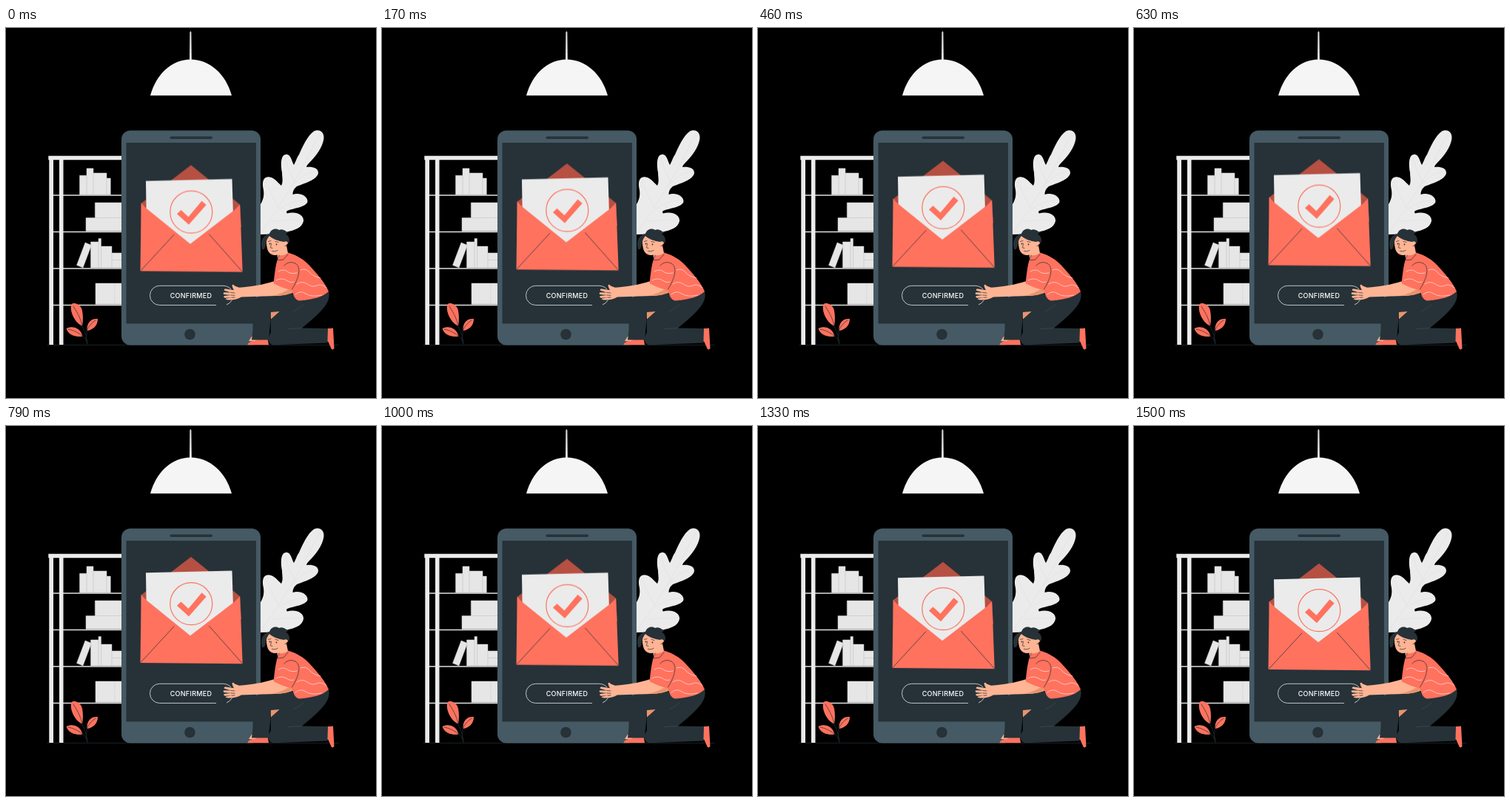
These frames come from a looping animation (500x500 px, 1.54 s). An HTML page:

```html
<!DOCTYPE html>
<html lang="en">
<head>
<meta charset="utf-8">
<title>Confirmed</title>
<style>
  html, body { margin: 0; width: 100%; height: 100%; overflow: hidden; background: #000; }
  svg { display: block; width: 100%; height: 100%; }
  .coral { fill: #ff725e; }
  .dark { fill: #263238; }
  .slate { fill: #455a64; }
  .pale { fill: #ebebeb; }
  .skin { fill: #ffb494; }
  .line { fill: none; stroke: #263238; stroke-width: .7; stroke-linecap: round; stroke-linejoin: round; }
  .wave { fill: none; stroke: #fff; stroke-width: .7; stroke-linecap: round; opacity: .8; }
  .vein { fill: none; stroke: #dcdcdc; stroke-width: .5; }
  .books { fill: #e6e6e6; stroke: #c9c9c9; stroke-width: .5; }
  text { font: 500 9px Inter, "Open Sans", sans-serif; letter-spacing: .3px; fill: #fff; }

  /* 37 held poses per loop, constant speed up and down */
  #mail { animation: float 1540ms -47ms infinite; }
  @keyframes float {
    0% { transform: translateY(0); animation-timing-function: steps(18, end); }
    48.6486% { transform: translateY(-9.5px); animation-timing-function: step-end; }
    51.3514% { transform: translateY(-9.5px); animation-timing-function: steps(18, end); }
    100% { transform: translateY(0); }
  }
</style>
</head>
<body>
<svg viewBox="0 0 500 500">
  <path class="line" d="M56 428.4H449"/>

  <g id="lamp">
    <path fill="#e0e0e0" d="M248 43 248.4 6Q249.4 2.5 250.4 6L250.9 43Z"/>
    <path fill="#f5f5f5" d="M195 91.3C203 62 224 42.5 249.5 42.5S297 62 305 91.3Z"/>
  </g>

  <g id="shelf">
    <path fill="#e0e0e0" d="M63 225.3H157V226.8H63ZM63 274.7H157V276.2H63ZM63 324.2H157V325.7H63ZM63 373.7H157V375.2H63Z"/>
    <path class="pale" d="M57.3 172.8H157V178.2H77.5V428H72V178.2H64V428H58.3V178.2H57.3Z"/>
    <g class="books">
      <path d="M99.5 199.2H109V225.2H99.5ZM109 189.8H118V225.2H109ZM118 196H136V225.2H118ZM136 203H141.3V225.2H136Z"/>
      <path d="M120.3 236H157V256.5H120.3ZM108 256.5H157V274.5H108Z"/>
      <path d="M95.5 320.5 107 290 115.5 293.5 104 324ZM114.5 289H125V324H114.5ZM125 284.5H128.5V324H125ZM128.5 295H143V324H128.5ZM143 304H157V313.5H143ZM143 313.5H157V324H143Z"/>
      <path d="M121 345H157V373.5H121ZM147 345V373.5"/>
    </g>
  </g>

  <g id="sprout">
    <path class="coral" d="M103 402.5C92 398 85.5 381 88.5 373.5C92 370 101 373 103 382C104.5 390 104 398 103 402.5ZM103.5 416.5C95 418.5 84 415 81.5 406C90 402 100.5 405 103.5 416.5ZM109.5 409C109 398 115 392 124 393C124 402 118 408 109.5 409Z"/>
    <path class="line" d="M91 376Q101 391 103 402.5Q109 414 110 427M84 407Q95 409 103.5 416.5Q108 419 109.5 425M121 395Q111 402 109.5 409Q107 418 110 427"/>
  </g>

  <g id="leaf">
    <path class="pale" d="M343 279V240C348 232 349 226 348 219C345 206 349 201 355 201.3C363 202 367 209 372 213C375 208 373 202 373 195C371 184 371 171 379 170.8C385 171 386 180 389 185C392 180 392 177 396 171C401 160 407 146 416 139.5C424 136 430 141 429.5 149C428 162 418 174 409 183Q406 186 406 188C412 187 422 188 422 196C420 205 406 209 393 214Q387 219 387.5 225C397 222 408 227 407.5 235C405 242 391 243 380 247Q378 249 380 250.5C391 247 403 252 402 261C400 270 391 273 378 276Q362 279 343 279Z"/>
    <path class="vein" d="M424 143C405 180 384 223 345 275M351 207Q359 226 368 243M377 175Q381 192 390 208M416 194Q397 199 386 215M402 233Q385 233 369 245M396 260Q379 259 358 261"/>
  </g>

  <g id="phone">
    <rect class="slate" x="156" y="138.5" width="188" height="290" rx="12"/>
    <rect class="dark" x="162.5" y="155" width="175.5" height="244.5"/>
    <rect class="dark" x="221.5" y="146.5" width="57.5" height="3.6" rx="1.8"/>
    <circle class="dark" cx="248.5" cy="414" r="7.3"/>
    <path fill="none" stroke="#fff" stroke-width=".7" d="M284 374.5H207.6A13.1 13.1 0 0 1 207.6 348.3H293.4Q300 348.5 304 353M305.5 367.5Q303 372 298 374"/>
    <text x="250" y="364.9" text-anchor="middle">CONFIRMED</text>
  </g>

  <g id="mail">
    <path fill="#b55042" d="M182.5 237.5 250 185.7 316 239 318 270 183 270Z"/>
    <path class="pale" d="M189 207.3 305.5 204.5 307.5 270 249 293 190 270Z"/>
    <path class="coral" d="M182.7 237 189 243.8 249 292.3 309 246.2 316.2 239 319.7 330.2 181.5 328.9Z"/>
    <path class="line" d="M182 328.5 227 279.8M319.3 329.7 274.5 279.3"/>
    <circle cx="250.3" cy="249.2" r="28.5" fill="none" stroke="#ff725e" stroke-width="1.2"/>
    <path class="coral" d="M231 251.7 236.5 246.5 246.5 255.7 264.5 234.2 270.7 239.5 247 266.2Z"/>
  </g>

  <g id="man">
    <path class="skin" d="M328 423 332 417 353 416 354 424ZM430 407 437 406 438 424 431 423Z"/>
    <path class="coral" d="M326.5 428.3C327 425 331 423 336 423L341 420.5 354 421.5 355 428.3ZM434.5 406.5 442 405.5 443.5 433C442 435 439.5 435 439 432L434.5 422Z"/>
    <path fill="#e8936f" d="M357 383H370L358 394Z"/>
    <path class="dark" d="M398 364 436 356C440 371 426 384 400 405.5L435 406 434.5 425.5 362 428.3C354 428 353 420 358 411L357.500 394 370 383 358 384Q357 402 355 421.5H332C335 404 333 391 333 376C333 367 338 362.5 346 362.5L386 359Z"/>
    <path fill="none" stroke="#455a64" stroke-width=".5" d="M400 405.5 381 406.5M388 383Q398 378 402 374"/>

    <path class="skin" d="M387 350 383 358Q374 362.5 364 362L318 363.5C313 366.5 307 368 300 367.5Q296 367 297 365.8L305 364.3 296 364.8Q293 363.5 295 362L304 361 294.5 360Q292.5 358 295 357.2L304 357.5 295 354.8Q294 352.5 297 352.5L308 354.2Q306 351 305.5 348Q307 345.5 309 348.5L315 350.8C332 349.5 347 347 363 342Z"/>
    <path class="line" d="M304 357.5 309 358M304 361 309 361.3M305 364.3 309 364"/>
    <path fill="#e8936f" d="M359 362Q374 359 387 350L388 358 377 361Z"/>

    <path class="skin" d="M366 299 379 294 382 309Q375 315 367 312Z"/>
    <path class="coral" d="M369 307Q377 308 381 303.5C393 307 403 313 411 322C420 332 431 344 436 356Q426 366 397 368.5Q389 368 387 354.5Q374 352 361.5 345C363 334 364 318 369 307Z"/>
    <path class="wave" d="M368 329Q375 325 380 329T393 331M398 327Q405 324 410 330T425 338M365 341Q373 337 379 341T389 343M393 346Q400 341 407 346T420 348T433 351M391 360Q398 354 405 359T427 361"/>
    <path class="line" d="M376 321Q382 314 391 318C399 323 397 336 386.5 353M369 307 366.5 314 375 313 381 306"/>

    <path class="skin" d="M352 284Q356 277 371 279L379 284C383 287 381 294 377 294C375 301 370 307 364 307C356 307 351 301 352 284Z"/>
    <path class="dark" d="M346 299C343 288 347 280 356 278C358 272 364 270 369 273C374 271 378 274 381 277L378 278.5C383 281 384 287 382 291Q379 287 376 289C368 288 360 285 356 281C351 286 352 292 350 297Q349 300 346 299Z"/>
    <path class="line" d="M354.5 288.5 358 287.5M364 288.5 368 289.5M358.5 291 357.5 297 360 297.5M359.5 301.5Q363 303 367 300.5"/>
    <circle class="dark" cx="356.500" cy="291.500" r=".9"/>
    <circle class="dark" cx="365.500" cy="292.500" r=".9"/>
  </g>
</svg>
</body>
</html>
```
